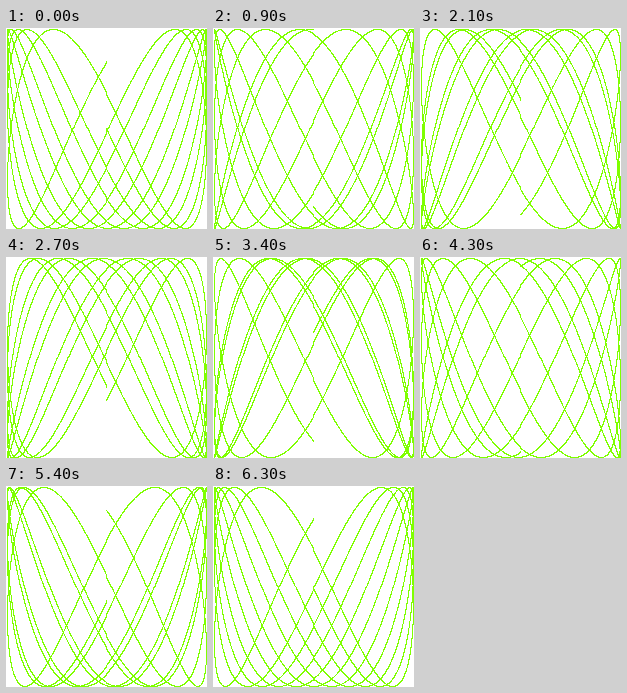
These frames come from a looping animation (201x201 px, 6400 ms). An HTML page with a canvas:

```html
<!DOCTYPE html>
<html lang="en">
<head>
<meta charset="utf-8">
<title>Lissajous</title>
<style>
html, body { margin: 0; width: 100%; height: 100%; overflow: hidden; background: #fff; }
canvas { display: block; width: 201px; height: 201px; image-rendering: pixelated; }
</style>
</head>
<body>
<canvas id="stage" width="201" height="201"></canvas>
<script>
const SIZE = 100;            // the stage spans -SIZE..SIZE
const SIDE = 2 * SIZE + 1;
const FREQ = 2.12382;        // vertical frequency relative to the horizontal one
const CYCLES = 5;
const RES = 0.001;
const STEPS = 64;
const STEP_MS = 100;
const PHASE_STEP = 0.1;

const ctx = document.getElementById('stage').getContext('2d');
const image = ctx.createImageData(SIDE, SIDE);
const pixels = new Uint32Array(image.data.buffer);
const WHITE = 0xffffffff;
const GREEN = 0xff00ff7f;    // ABGR

const toPixel = v => SIZE + Math.trunc(v * SIZE + 0.5);

function draw(phase) {
  pixels.fill(WHITE);
  for (let t = 0; t < CYCLES * 2 * Math.PI; t += RES) {
    const x = toPixel(Math.sin(t));
    const y = toPixel(Math.sin(t * FREQ + phase));
    pixels[y * SIDE + x] = GREEN;
  }
  ctx.putImageData(image, 0, 0);
}

let shown = -1;
const start = performance.now();

function tick() {
  const elapsed = Math.max(0, performance.now() - start);
  const step = Math.floor(elapsed / STEP_MS) % STEPS;
  if (step !== shown) {
    shown = step;
    draw(step * PHASE_STEP);
  }
  requestAnimationFrame(tick);
}
tick();
</script>
</body>
</html>
```
